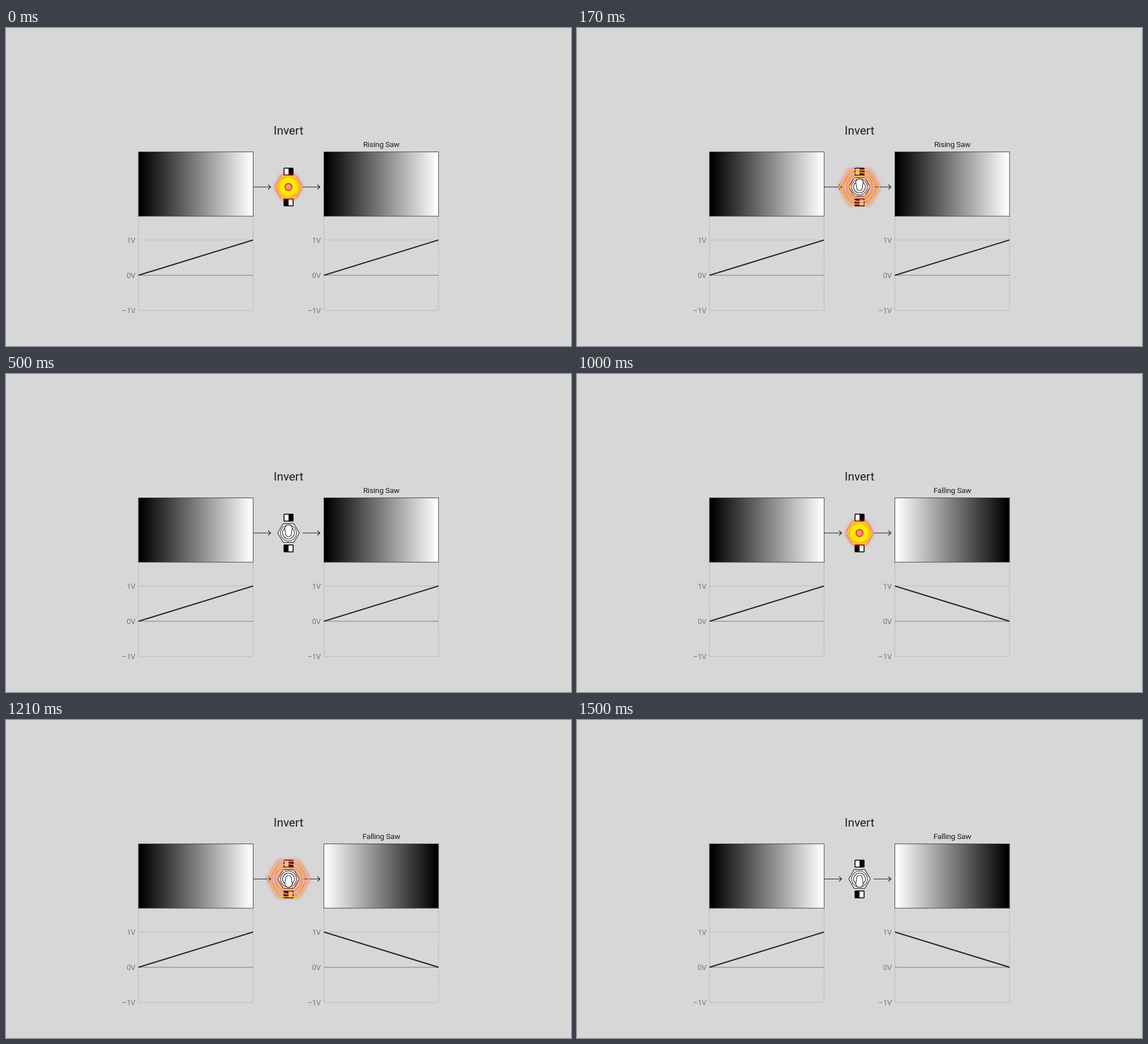
An HTML page that plays this animation: 998x561 px, repeating every 2040 ms.

```html
<!DOCTYPE html>
<html lang="en">
<head>
<meta charset="utf-8">
<title>Invert</title>
<style>
  html, body { margin: 0; width: 100%; height: 100%; overflow: hidden; background: #d7d7d7; }
  svg { display: block; width: 100vw; height: 100vh; }
  text { font-family: Roboto, sans-serif; fill: #1c1c1c; text-anchor: middle; }
  .title { font-size: 20.8px; }
  .name { font-size: 13.6px; letter-spacing: -.2px; }
  .tick { font-size: 13px; font-weight: 300; fill: #444; text-anchor: end; }
  .arrow { fill: none; stroke: #222; stroke-width: 1.2; }
  .switch { fill: #fff; stroke: #222; stroke-width: 1.1; }
  #flash { filter: drop-shadow(0 0 2.5px rgba(255, 40, 50, .75)) drop-shadow(0 0 3px rgba(255, 50, 60, .6)); }
  #flash * { vector-effect: non-scaling-stroke; }
</style>
</head>
<body>
<svg viewBox="0 0 998 561">
  <defs>
    <linearGradient id="rise"><stop offset=".02"/><stop offset=".99" stop-color="#fff"/></linearGradient>
    <linearGradient id="fall"><stop offset=".01" stop-color="#fff"/><stop offset=".98"/></linearGradient>
  </defs>
  <text class="title" x="499" y="188">Invert</text>
  <text class="name" id="name" x="663" y="210"></text>
  <g id="plots"></g>
  <path class="arrow" d="M437 280.5H467.5M463 276.3l4.5 4.2l-4.5 4.2M524 280.5H554.5M550 276.3l4.5 4.2l-4.5 4.2"/>
  <g id="icons"></g>
  <g class="switch" transform="translate(499 280.5)">
    <path d="M-19 0L-9.5-16.4H9.5L19 0L9.5 16.4H-9.5Z"/>
    <circle r="14"/>
    <circle r="10.5"/>
    <path id="lever"/>
  </g>
  <g id="flash">
    <g id="burst" transform="translate(499 280.5)">
      <g id="glow" stroke="none">
        <path d="M-19 0L-9.5-16.4H9.5L19 0L9.5 16.4H-9.5Z" fill="#ffb30a"/>
        <circle r="14.4" fill="#ffe900"/>
        <circle r="5.3" fill="#ff8f8c" stroke="#dc2030" stroke-width="1.5"/>
      </g>
      <g id="rings" fill="none" stroke-width="1.6">
        <path d="M-19 0L-9.5-16.4H9.5L19 0L9.5 16.4H-9.5Z" stroke="#ffd21c"/>
        <circle r="14" stroke="#ffd21c"/>
        <circle id="inner" r="10.5" stroke="#ffd21c"/>
      </g>
    </g>
  </g>
</svg>
<script>
const LOOP = 2040, HALF = 1000, FLASH_STEPS = 12, STEPS_PER_MS = 0.024;
const $ = id => document.getElementById(id);
const set = (id, attrs) => {
  for (const key in attrs) $(id).setAttribute(key, attrs[key]);
};

function plot(x, id) {
  const right = x + 202.5;
  const level = (y, color) => `<path d="M${x} ${y}H${right}" stroke="${color}"/>`;
  const tick = (y, label) => `<text class="tick" x="${x - 5.5}" y="${y}">${label}</text>`;
  return `<g fill="none">
    <path d="M${x} 332V498.5M${right} 332V498.5" stroke="#a2a2a2" stroke-dasharray="2.5 2"/>
    ${level(374, '#bcbcbc')}${level(436.2, '#777')}${level(498.5, '#bcbcbc')}
    <rect id="${id}Box" x="${x}" y="218.5" width="202.5" height="113.5" fill="url(#rise)" stroke="#444"/>
    <path id="${id}Line" d="M${x} 436.2L${right} 374" stroke="#222" stroke-width="2.1"/>
    </g>${tick(378.5, '1V')}${tick(440.7, '0V')}${tick(503, '–1V')}`;
}

function icon(y, whiteX) {
  return `<rect x="490.3" y="${y}" width="17.6" height="13.8" rx="1.5"/>
    <rect x="${whiteX}" y="${y + 1.6}" width="7.2" height="10.6" fill="#fff"/>`;
}

// Wide cap at the end the lever points to, narrow at the pivot.
function leverPath(dir) {
  const sweep = dir < 0 ? 1 : 0;
  return `M-6.5 ${dir * 8}A6.5 6.5 0 0 ${sweep} 6.5 ${dir * 8}` +
    `L5 ${-dir * 1.5}A5 5 0 0 ${sweep} -5 ${-dir * 1.5}Z`;
}

const CENTRED = 'M-6 0A6 6 0 0 1 6 0A6 6 0 0 1-6 0Z';

$('plots').innerHTML = plot(234, 'in') + plot(561.5, 'out');
$('icons').innerHTML = icon(246.5, 491.9) + icon(300.8, 499.1);

function draw(t) {
  const falling = t >= HALF;
  const step = Math.floor((t % HALF + 6) * STEPS_PER_MS);
  const late = t >= 2 * HALF - 6;
  const p = late ? 1 : Math.min(1, step / FLASH_STEPS);

  $('name').textContent = falling ? 'Falling Saw' : 'Rising Saw';
  set('outBox', { fill: falling ? 'url(#fall)' : 'url(#rise)' });
  set('outLine', { d: falling ? 'M561.5 374L764 436.2' : 'M561.5 436.2L764 374' });
  set('lever', { d: p === 0 ? CENTRED : leverPath(falling ? 1 : -1) });

  const scale = 1.16 + 0.84 * (1 - (1 - p) ** 4);
  set('burst', { transform: `translate(499 280.5) scale(${scale})` });
  set('flash', { opacity: Math.min(1, ((1 - p) / 0.58) ** 2) });
  set('glow', { opacity: Math.max(0, 1 - p / 0.3) });
  set('inner', { opacity: Math.min(1, p * 5) });
  set('rings', { 'stroke-width': 1.8 - 0.8 * p });
}

const start = performance.now();
function tick(now) {
  draw(Math.max(0, now - start) % LOOP);
  requestAnimationFrame(tick);
}
draw(0);
requestAnimationFrame(tick);
</script>
</body>
</html>
```
